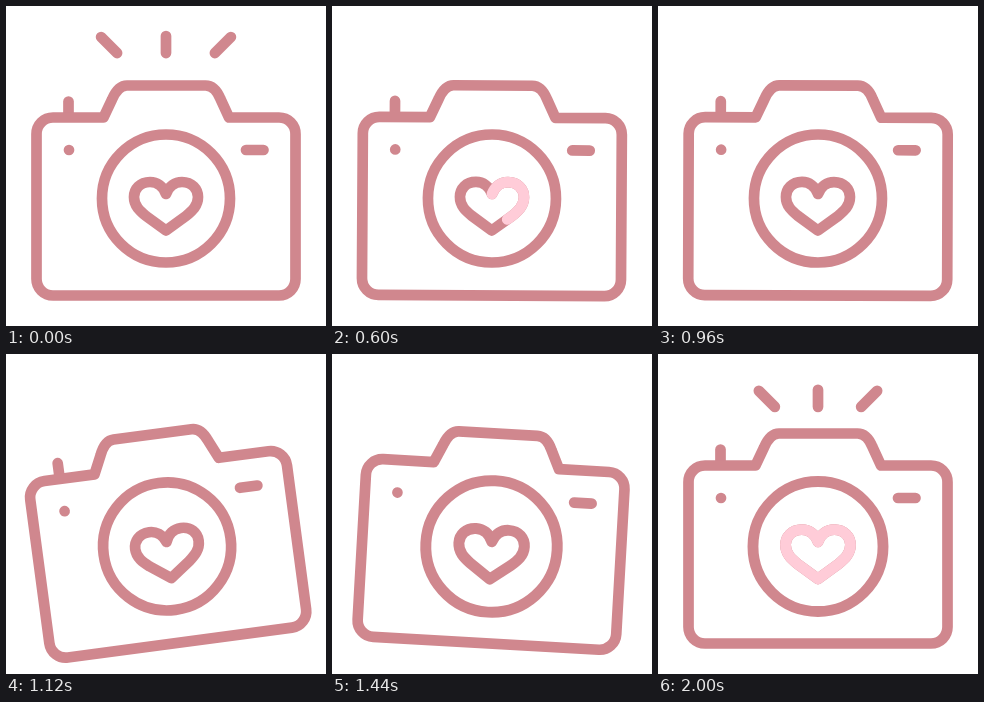
Recreate the animation shown at these times as an HTML page. Size 320 px wide and 320 px high, loop 2040 ms.

```html
<!DOCTYPE html>
<html>
<head>
<meta charset="utf-8">
<style>
html, body { margin: 0; width: 100%; height: 100%; overflow: hidden; background: #fff; }
svg { display: block; width: 100%; height: 100%; }
</style>
</head>
<body>
<svg viewBox="0 0 320 320" fill="none" stroke="#d0878e" stroke-width="10.700" stroke-linecap="round" stroke-linejoin="round">
  <defs>
    <path id="heart" pathLength="1" d="M160 188C157 180 151 176 144 176C134 176 128 183 128 191C128 200 134 205 140 210L160 224.5L180 210C186 205 192 200 192 191C192 183 186 176 176 176C169 176 163 180 160 188"/>
  </defs>
  <g id="rays">
    <path d="M101 37L117 53"/>
    <path d="M160 36V53"/>
    <path d="M219 37L203 53"/>
  </g>
  <g id="camera">
    <path id="button" d="M62.5 95.5V111"/>
    <path fill="#fff" d="M47 111.5H97.500L106 93.500Q112 79.500 121 79.500H199.500Q209 79.500 214.500 93L223 111.500H273A16.500 16.500 0 0 1 289.500 128V273A16.500 16.500 0 0 1 273 289.500H47A16.500 16.500 0 0 1 30.500 273V128A16.500 16.500 0 0 1 47 111.500Z"/>
    <path d="M63 144h.01M240 144H257.500"/>
    <circle id="lens" cx="160" cy="192.500" r="64"/>
    <g id="hearts">
      <use href="#heart"/>
      <use id="glow" href="#heart" stroke="#ffccd8"/>
    </g>
  </g>
</svg>
<script>
const LOOP = 2040;
const $ = id => document.getElementById(id);
const set = (id, name, value) => $(id).setAttribute(name, value);
const ramp = (t, a, b) => Math.min(1, Math.max(0, (t - a) / (b - a)));
const ease = p => (1 - Math.cos(Math.PI * p)) / 2;
const zoom = (s, y) => `translate(160 ${y}) scale(${s}) translate(-160 ${-y})`;

// [time, degrees]
const sway = [[0, 0], [560, 0], [820, 5.6], [1140, -7.7], [1490, 3.8], [1810, 0], [LOOP, 0]];

function angle(t) {
  const i = sway.findIndex(k => k[0] > t);
  const [t0, a0] = sway[i - 1], [t1, a1] = sway[i];
  return a0 + (a1 - a0) * ease(ramp(t, t0, t1));
}

function drawRays(t) {
  const s = t < 1000 ? t + 40 : t - 2000;
  const d = s < 0 ? s * .165 : s * .14 + s * s * .0001;
  const [left, mid, right] = $("rays").children;
  left.setAttribute("transform", `translate(${-d} ${-d})`);
  mid.setAttribute("transform", `translate(0 ${-d})`);
  right.setAttribute("transform", `translate(${d} ${-d})`);
  set("rays", "visibility", s > -280 && s < 320 ? "visible" : "hidden");
}

function drawGlow(t) {
  const flash = t > 1500;
  const start = flash ? 0 : ramp(t, 255, 830);
  const end = flash ? 1 : ramp(t, 80, 575);
  set("glow", "stroke-dasharray", `${end - start} 2`);
  set("glow", "stroke-dashoffset", -start);
  set("glow", "opacity", flash ? ramp(t, 1800, 1960) : +(end > start));
}

function draw(t) {
  set("camera", "transform", `rotate(${angle(t)} 160 184)`);
  const press = ease(ramp(t, 1200, 1400)) - ramp(t, 1500, 1770);
  set("button", "transform", `translate(0 ${18 * press})`);
  const pulse = Math.sin(Math.PI * ramp(t, 1380, LOOP)) ** 1.2;
  set("lens", "transform", zoom(1 + .122 * pulse, 192.5));
  set("hearts", "transform", zoom(1 + .11 * pulse, 200));
  drawRays(t);
  drawGlow(t);
}

const origin = performance.now();
function tick() {
  draw((performance.now() - origin) % LOOP);
  requestAnimationFrame(tick);
}
tick();
</script>
</body>
</html>
```
